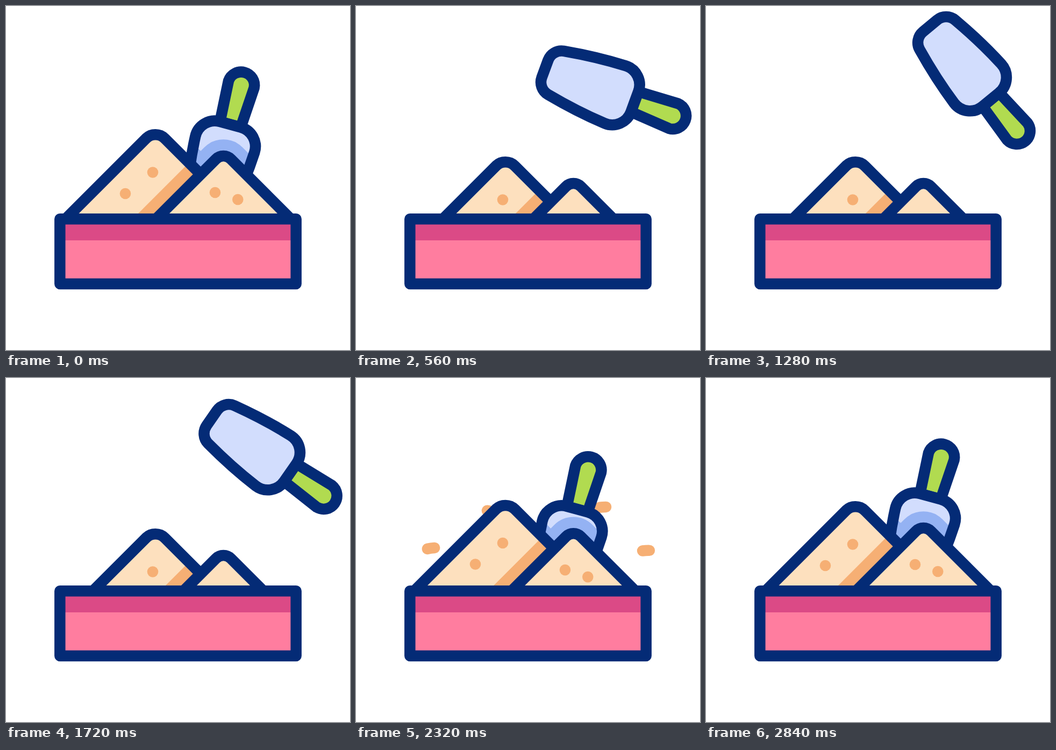
Recreate the animation shown at these times as an HTML page. Size 640x640 px, loop 3600 ms.

```html
<!DOCTYPE html>
<html lang="en">
<head>
<meta charset="utf-8">
<title>Scoop and sand</title>
<style>
  @property --x { syntax: "<length>"; inherits: true; initial-value: 420px; }
  @property --y { syntax: "<length>"; inherits: true; initial-value: 211px; }
  @property --turn { syntax: "<angle>"; inherits: true; initial-value: 15.3deg; }
  @property --left { syntax: "<length>"; inherits: true; initial-value: 0px; }
  @property --right { syntax: "<length>"; inherits: true; initial-value: 0px; }

  html, body { margin: 0; width: 100%; height: 100%; overflow: hidden; background: #fff; }

  svg {
    display: block; width: 100vw; height: 100vh;
    --sine: cubic-bezier(.37, 0, .63, 1);
    animation: slide-x 3.6s infinite, slide-y 3.6s infinite, turn 3.6s infinite,
               sink-left 3.6s infinite, sink-right 3.6s infinite;
    animation-timing-function: cubic-bezier(.37, 0, .63, 1);
  }

  .scoop { transform: translate(var(--x), var(--y)) rotate(var(--turn)); }
  .left { transform: translateY(var(--left)); }
  .right { transform: translateY(var(--right)); }

  .line { stroke: #042b76; stroke-width: 20.5; stroke-linejoin: round; }
  .sand { fill: #fde0be; }
  .dark { fill: #f6af74; }
  .steel { fill: #d2ddfd; }
  .shade { stroke-width: 61.5; }
  .sand-shade { fill: #f6af74; stroke: #f6af74; }
  .steel-shade { fill: #94b2f3; stroke: #94b2f3; }

  .grains path {
    fill: none; stroke: #f6af74; stroke-width: 0; stroke-linecap: round;
    stroke-dasharray: 6 200;
    animation: fly 3.6s infinite, grow 3.6s linear infinite;
  }

  /* scoop */
  @keyframes slide-x {
    0% { --x: 420px; animation-timing-function: cubic-bezier(.43, 0, .12, 1); }
    23.89% { --x: 536px; }
    47.2% { --x: 536.5px; }
    50.28% { --x: 540px; animation-timing-function: cubic-bezier(.4, 0, .7, .83); }
    57.22% { --x: 433px; animation-timing-function: cubic-bezier(.33, .67, .67, 1); }
    61.67% { --x: 413.5px; }
    73.89%, 100% { --x: 420px; }
  }
  @keyframes slide-y {
    0% { --y: 211px; animation-timing-function: cubic-bezier(.3, 0, .3, 1); }
    8.33%, 47.78% { --y: 181.5px; }
    52.5% { --y: 168px; animation-timing-function: cubic-bezier(.5, 0, .9, .42); }
    57.22% { --y: 187px; animation-timing-function: cubic-bezier(.33, .67, .67, 1); }
    61.67% { --y: 238px; }
    73.89%, 100% { --y: 211px; }
  }
  @keyframes turn {
    0% { --turn: 15.3deg; animation-timing-function: cubic-bezier(.225, 0, 0, 1); }
    44.31% { --turn: 142.3deg; }
    58.67%, 100% { --turn: 15.3deg; }
  }

  /* heaps */
  @keyframes sink-left {
    0% { --left: 0px; }
    7.8%, 56.4% { --left: 51px; }
    63.3% { --left: -2.5px; }
    78%, 100% { --left: 0px; }
  }
  @keyframes sink-right {
    0%, 3.89% { --right: 0px; }
    15.56%, 58.33% { --right: 51px; }
    67.2% { --right: -1px; }
    78.5%, 100% { --right: 0px; }
  }

  /* flying grains */
  @keyframes fly {
    0%, 59.4% { stroke-dashoffset: 0; animation-timing-function: ease-out; }
    74%, 100% { stroke-dashoffset: -94; }
  }
  @keyframes grow {
    0%, 59.4% { stroke-width: 0; }
    60.5%, 70.5% { stroke-width: 20.5; }
    74%, 100% { stroke-width: 0; }
  }
</style>
</head>
<body>
<svg viewBox="0 0 640 640">
  <defs>
    <path id="heap-l" d="M67 440 L260.3 246.7 A25 25 0 0 1 295.7 246.7 L489 440"/>
    <path id="heap-r" d="M235.5 440 L390.7 284.8 A19.5 19.5 0 0 1 418.3 284.8 L573.5 440"/>
    <path id="blade" d="M-20 9.7 H20 A37 37 0 0 1 57 48.4 Q54.3 104 43 165.8 A26.5 26.5 0 0 1 17 187.5
      H-17 A26.5 26.5 0 0 1 -43 165.8 Q-54.3 104 -57 48.4 A37 37 0 0 1 -20 9.7 Z"/>
    <clipPath id="above"><rect width="640" height="400"/></clipPath>
    <clipPath id="in-heap"><use href="#heap-l" class="left"/></clipPath>
    <clipPath id="in-blade"><use href="#blade" class="scoop"/></clipPath>
  </defs>

  <g class="grains">
    <path pathLength="100" d="M240 360 Q151 266 45 372"/>
    <path pathLength="100" d="M440 362 Q566 275 626.5 372"/>
    <path pathLength="100" d="M330 300 Q247 209 160 270"/>
    <path pathLength="100" d="M390 300 Q439 194 545 275"/>
  </g>

  <g clip-path="url(#above)">
    <g class="scoop">
      <path class="line" fill="#b1db50" d="M-20 10 L-24.7 -67.5 A24.75 24.75 0 0 1 24.7 -67.5 L20 10 Z"/>
      <use href="#blade" class="steel"/>
    </g>
    <g clip-path="url(#in-blade)">
      <g class="right">
        <use href="#heap-l" class="shade steel-shade"/>
        <use href="#heap-r" class="shade steel-shade"/>
      </g>
    </g>
    <g class="scoop"><use href="#blade" class="line" fill="none"/></g>

    <g class="left">
      <use href="#heap-l" class="sand"/>
    </g>
    <g clip-path="url(#in-heap)">
      <g class="right"><use href="#heap-r" class="shade sand-shade"/></g>
    </g>
    <g class="left">
      <g class="dark">
        <circle cx="273" cy="309.5" r="10.3"/>
        <circle cx="222" cy="349" r="10.3"/>
      </g>
      <use href="#heap-l" class="line" fill="none"/>
    </g>

    <g class="right">
      <use href="#heap-r" class="line sand"/>
      <g class="dark">
        <circle cx="389" cy="347" r="10.3"/>
        <circle cx="431.3" cy="360" r="10.3"/>
      </g>
    </g>
  </g>

  <rect x="100.3" y="396.3" width="439.4" height="120.7" fill="#ff7d9f"/>
  <rect x="100.3" y="396.3" width="439.4" height="39.7" fill="#db4a86"/>
  <rect class="line" x="100.3" y="396.3" width="439.4" height="120.7" fill="none"/>
</svg>
</body>
</html>
```
